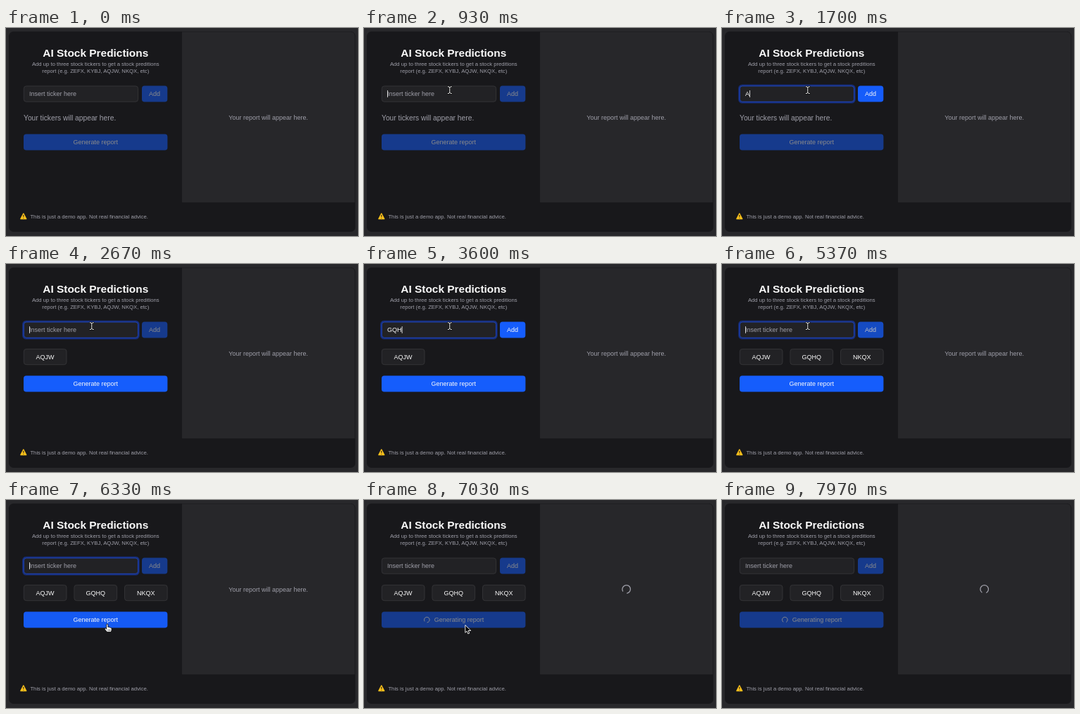
These frames come from a looping animation (500 px wide and 297 px high, 8 s). An HTML page:

```html
<!DOCTYPE html>
<html lang="en">
<head>
<meta charset="utf-8">
<title>AI Stock Predictions</title>
<style>
  html, body { margin: 0; width: 100%; height: 100%; overflow: hidden; background: #28282b; }
  svg { display: block; width: 500px; height: 297px; }
  text { font: 9px "Liberation Sans", Arial, sans-serif; fill: #9f9fa9; }
  .title { font-size: 15.43px; font-weight: bold; }
  .small { font-size: 7.71px; }
  .large { font-size: 10.25px; }
  .mid { text-anchor: middle; }
  .light { fill: #fafafa; }
  .field { fill: #222225; stroke: #3d3d40; stroke-width: .7; }
  .blue { fill: #155dfc; }
  .spin { fill: none; stroke-width: 2; stroke-linecap: round; stroke-linejoin: round; }
</style>
</head>
<body>
<svg viewBox="0 0 500 297">
  <defs>
    <path id="arc" d="M9 0A9 9 0 1 1 2.781 -8.56"/>
  </defs>

  <rect x="4" y="5" width="492.3" height="286" rx="6.5" fill="#18181b"/>
  <path d="M250 5.5H489.5A6 6 0 0 1 495.5 11.5V249H250Z" fill="#27272a"/>

  <text class="title light mid" x="127.3" y="41.3">AI Stock Predictions</text>
  <text class="small mid" x="127.3" y="54">Add up to three stock tickers to get a stock preditions</text>
  <text class="small mid" x="127.3" y="64.3">report (e.g. ZEFX, KYBJ, AQJW, NKQX, etc)</text>

  <rect id="ring" x="24.1" y="81.6" width="164.6" height="25" rx="4.6" fill="none" stroke="#1447e6" stroke-opacity=".5" stroke-width="1.9"/>
  <rect class="field" x="25.3" y="82.9" width="162.3" height="22.4" rx="3.6"/>
  <rect id="focusBorder" x="25.3" y="82.9" width="162.3" height="22.4" rx="3.6" fill="none" stroke="#1447e6" stroke-width=".8"/>
  <text id="placeholder" x="33" y="97.2">Insert ticker here</text>
  <text id="typed" class="light" x="33" y="97.2"></text>
  <rect id="caret" y="89" width=".8" height="10" fill="#fafafa"/>

  <g id="add">
    <rect class="blue" x="193" y="82.6" width="36.3" height="23" rx="3.8"/>
    <text class="light mid" x="211.1" y="97.2">Add</text>
  </g>

  <text id="empty" class="large" x="25" y="132.3">Your tickers will appear here.</text>
  <g id="chips"></g>

  <g id="generate">
    <rect id="generateBox" class="blue" x="25" y="151.6" width="204.4" height="23" rx="3.8"/>
    <text id="generateLabel" class="light mid" x="127.3" y="166.2">Generate report</text>
    <g id="busy">
      <use class="spin" href="#arc" data-at="89.3 163.1" data-scale=".43" stroke="#fafafa"/>
      <text class="light" x="99.7" y="166.2">Generating report</text>
    </g>
  </g>

  <text id="report" class="mid" x="372.7" y="130.5">Your report will appear here.</text>
  <use id="loader" class="spin" href="#arc" data-at="372.7 127.4" data-scale=".643" stroke="#9f9fa9"/>

  <path d="M24.8 264.8L28.8 272.6H20.8Z" fill="#fcc21b" stroke="#fcc21b" stroke-width="1.2" stroke-linejoin="round"/>
  <path d="M24.8 266.8V269.8M24.8 271.3V272" stroke="#2f2a20" stroke-width="1.2"/>
  <text class="small" x="34.4" y="271.8">This is just a demo app. Not real financial advice.</text>

  <g id="cursor" stroke-linejoin="round" stroke-linecap="round">
    <path id="arrow" d="M0 0V10.4L2.4 8.2L4 12L5.9 11.2L4.3 7.5H7.6Z" fill="#000" stroke="#fff" stroke-width=".9"/>
    <g id="beam" fill="none">
      <path d="M-2.6 -4.8Q0 -4.8 0 -3.6Q0 -4.8 2.6 -4.8M0 -3.6V3.8M-2.6 5Q0 5 0 3.8Q0 5 2.6 5" stroke="#000" stroke-width="2.3"/>
      <path d="M-2.6 -4.8Q0 -4.8 0 -3.6Q0 -4.8 2.6 -4.8M0 -3.6V3.8M-2.6 5Q0 5 0 3.8Q0 5 2.6 5" stroke="#fff" stroke-width="1"/>
    </g>
    <g id="hand" stroke="#000" stroke-width=".8">
      <path d="M-1.1 5V-1Q-1.1 -2 0 -2Q1.1 -2 1.1 -1V2.4Q2.7 1.8 3 3Q4.5 2.4 4.9 3.6Q6.3 3.2 6.3 4.8V6.4Q6.3 8 5.2 9.6H-.2Q-1 8.2 -3 6.3Q-4.2 4.9 -3.2 4.2Q-2.3 3.7 -1.1 5Z" fill="#fff"/>
      <path d="M1 6V8M2.7 6V8M4.3 6V8" fill="none" stroke-width=".5"/>
    </g>
  </g>
</svg>
<script>
const LOOP = 8000, FOCUS = 930, SUBMIT = 6570, SPIN_START = 6610, LEAVE = 7500;
const ENTRIES = [
  { word: "AQJW", keys: [1570, 1870, 2030, 2200], enter: 2530 },
  { word: "GQHQ", keys: [3300, 3430, 3570, 3700], enter: 3870 },
  { word: "NKQX", keys: [4630, 4830, 5070, 5200], enter: 5300 }
];
const MOVES = [
  { start: 180, end: 770, from: [-8, 190], to: [121.8, 88.5] },
  { start: 6070, end: 6320, from: [121.8, 88.5], to: [143.8, 179] },
  { start: 7290, end: LEAVE, from: [143.8, 179], to: [29, 222] }
];

const el = id => document.getElementById(id);
const show = (id, on) => el(id).setAttribute("visibility", on ? "inherit" : "hidden");
const fade = (id, value) => el(id).setAttribute("opacity", value);
const clamp = v => Math.min(1, Math.max(0, v));
const smooth = v => v * v * (3 - 2 * v);
const ramp = (t, start) => smooth(clamp((t - start) / 140));
const between = (v, low, high) => v >= low && v <= high;

el("chips").innerHTML = ENTRIES.map(({ word }, i) => {
  const x = 25.3 + i * 71.6;
  return `<g id="chip${i}"><rect class="field" x="${x}" y="121.4" width="60.7" height="22.3" rx="3.6"/>
    <text class="light mid" x="${x + 30.3}" y="135.5">${word}</text></g>`;
}).join("");
const spinners = document.querySelectorAll(".spin");

function drawInput(t) {
  const entry = ENTRIES.find(e => t >= e.keys[0] && t < e.enter);
  const text = entry ? entry.word.slice(0, entry.keys.filter(k => t >= k).length) : "";
  const typed = el("typed");
  typed.textContent = text;
  show("placeholder", !text);
  show("caret", between(t, FOCUS, SUBMIT - 1));
  el("caret").setAttribute("x", 33.2 + (text ? typed.getComputedTextLength() : 0));

  const focus = ramp(t, FOCUS) - ramp(t, SUBMIT);
  fade("ring", focus);
  fade("focusBorder", focus);
  const ready = ENTRIES.reduce((sum, e) => sum + ramp(t, e.keys[0]) - ramp(t, e.enter), 0);
  fade("add", .5 + .5 * ready);
}

function drawReport(t) {
  const first = ENTRIES[0].enter, busy = t >= SUBMIT;
  ENTRIES.forEach((e, i) => show("chip" + i, t >= e.enter));
  show("empty", t < first);
  el("generate").setAttribute("transform", `translate(0 ${t >= first ? 8 : 0})`);
  fade("generate", .5 + .5 * (ramp(t, first) - ramp(t, SUBMIT)));
  fade("generateBox", 1 - .1 * (ramp(t, 6270) - ramp(t, SUBMIT)));
  show("generateLabel", !busy);
  show("busy", busy);
  show("report", !busy);
  show("loader", busy);
  const angle = (t - SPIN_START) * .36;
  for (const s of spinners)
    s.setAttribute("transform", `translate(${s.dataset.at}) scale(${s.dataset.scale}) rotate(${angle})`);
}

function drawCursor(t) {
  const move = MOVES.filter(m => t >= m.start).pop() || MOVES[0];
  const p = smooth(clamp((t - move.start) / (move.end - move.start)));
  const [x, y] = move.from.map((v, i) => v + (move.to[i] - v) * p);
  const overInput = between(x, 25, 188) && between(y, 82, 106);
  const overButton = t < SUBMIT && between(x, 25, 229.5) && between(y, 159.5, 182.6);
  el("cursor").setAttribute("transform", `translate(${x} ${y})`);
  show("cursor", t < LEAVE);
  show("beam", overInput);
  show("hand", overButton);
  show("arrow", !overInput && !overButton);
}

function frame() {
  const t = performance.now() % LOOP;
  drawInput(t);
  drawReport(t);
  drawCursor(t);
  requestAnimationFrame(frame);
}
frame();
</script>
</body>
</html>
```
